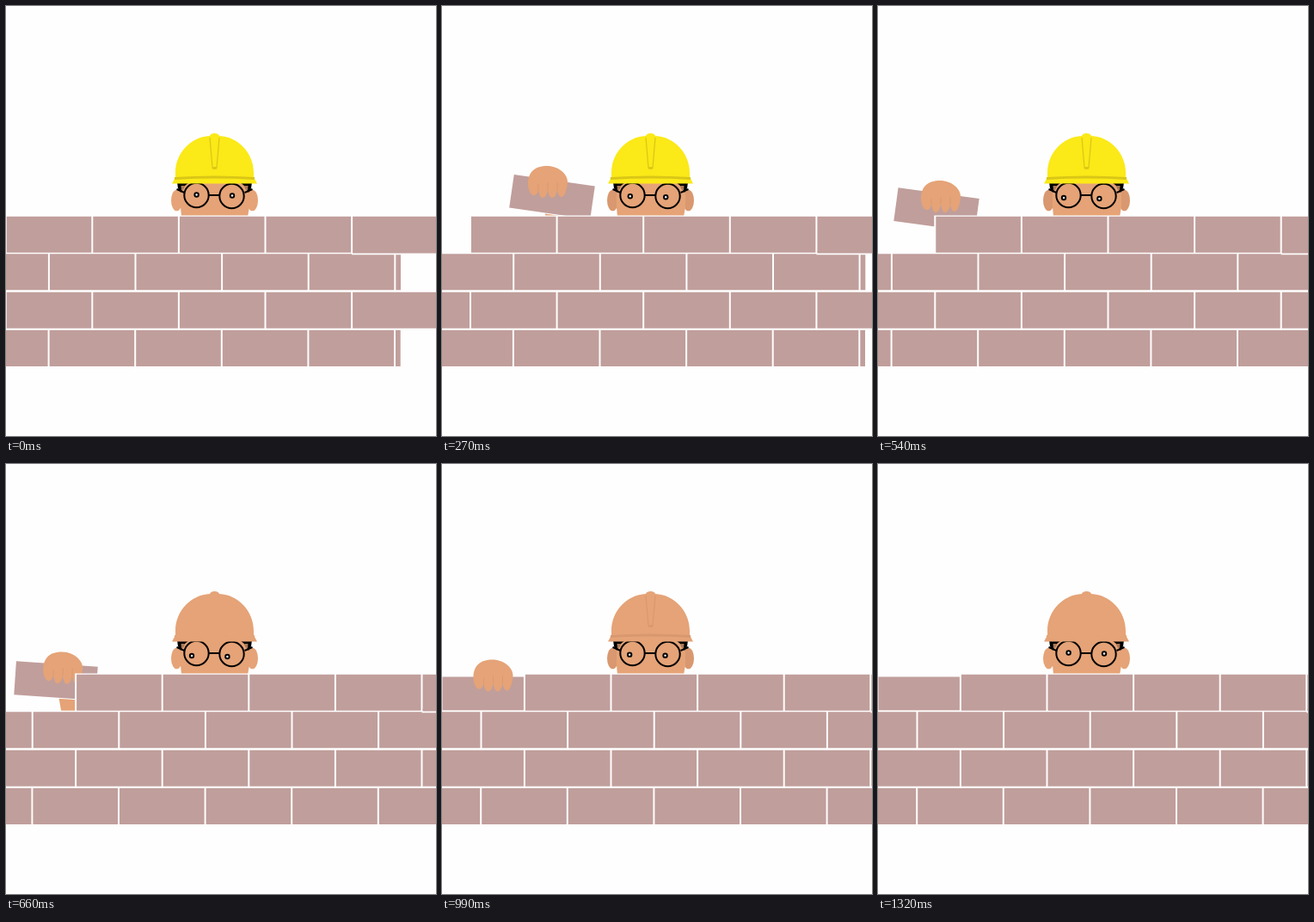
An HTML page without scripts that plays this animation: 500x500 px, repeating every 1.47 s.

```html
<!DOCTYPE html>
<html lang="en">
<head>
<meta charset="utf-8">
<title>Bricklayer</title>
<style>
  html, body { margin: 0; width: 100%; height: 100%; overflow: hidden; background: #fefefe; }
  svg { display: block; width: 100vw; height: 100vh; }

  :root { --skin: #e5a377; --shade: #d9986f; --brick: #c09e9b; --paper: #fefefe; --hat: #fbe918; --trim: #d9c616; }

  .skin { fill: var(--skin); }
  .paper { fill: var(--paper); }
  .row { fill: none; stroke: var(--brick); stroke-width: 42; stroke-dasharray: 98.6 2; }
  .block { fill: var(--brick); stroke: var(--paper); stroke-width: 2; paint-order: stroke; }
  .crease { fill: none; stroke: var(--shade); stroke-width: .8; }
  .glasses { fill: none; stroke: #000; stroke-width: 2; }

  .wall, .block, .arm, .pupils, .hat, .trim, .ears, .hair {
    animation: 1470ms infinite;
  }
  .wall { animation-name: wall; }
  .block { animation-name: block; }
  .arm { animation-name: arm; }
  .pupils { animation-name: look; }
  .hat, .trim, .ears, .hair { animation-timing-function: step-end; }
  .hat { animation-name: hat; }
  .trim { animation-name: trim; }
  .ears { animation-name: ears; }
  .hair { animation-name: hair; }

  /* Motion advances in 30 ms ticks. */
  @keyframes wall {
    0% { translate: 0; animation-timing-function: steps(26); }
    53.06%, 100% { translate: 96.2px; }
  }
  @keyframes block {
    0% { translate: 170px 290px; rotate: 8deg; animation-timing-function: steps(5); }
    10.2% { translate: 146px 246.5px; rotate: 8deg; animation-timing-function: steps(4); }
    18.36% { translate: 128px 222px; rotate: 8.2deg; animation-timing-function: steps(4); }
    26.53% { translate: 107.5px 213px; rotate: 8.3deg; animation-timing-function: steps(5); }
    36.73% { translate: 68px 237px; rotate: 7.7deg; animation-timing-function: steps(8); }
    53.06%, 100% { translate: 48px 267px; rotate: 0deg; }
  }
  @keyframes arm {
    0% { translate: 185px 268px; rotate: 0deg; animation-timing-function: steps(5); }
    10.2% { translate: 152px 221px; rotate: 0deg; animation-timing-function: steps(4); }
    18.36% { translate: 123px 205px; rotate: 0deg; animation-timing-function: steps(4); }
    26.53% { translate: 94.5px 202.5px; rotate: 0deg; animation-timing-function: steps(5); }
    36.73% { translate: 73px 222px; rotate: 0deg; animation-timing-function: steps(8); }
    53.06% { translate: 59.5px 253px; rotate: 4deg; animation-timing-function: steps(7); }
    67.34% { translate: 59.5px 246.5px; rotate: 0deg; animation-timing-function: steps(1); }
    69.38% { translate: 59.5px 246.5px; rotate: 0deg; animation-timing-function: steps(9); }
    87.75%, 100% { translate: 59.5px 308px; rotate: 0deg; }
  }
  @keyframes look {
    0% { translate: 0 0; animation-timing-function: steps(18); }
    36.73% { translate: -5.6px 3.5px; }
    57.14% { translate: -5.6px 3.5px; animation-timing-function: steps(13); }
    83.67%, 100% { translate: 0 0; }
  }
  @keyframes hat {
    0% { fill: var(--hat); }
    44.89%, 100% { fill: var(--skin); }
  }
  @keyframes trim {
    0% { stroke: var(--trim); }
    44.89% { stroke: var(--skin); }
    59.18% { stroke: var(--shade); }
    77.55%, 100% { stroke: var(--skin); }
  }
  @keyframes ears {
    0% { fill: var(--skin); }
    2.04% { fill: var(--shade); }
    44.89% { fill: var(--skin); }
    59.18% { fill: var(--shade); }
    77.55%, 100% { fill: var(--skin); }
  }
  @keyframes hair {
    0% { fill: #000; }
    59.18% { fill: #a97a58; }
    77.55%, 100% { fill: #000; }
  }
</style>
</head>
<body>
<svg viewBox="0 0 500 500">
  <defs>
    <g id="temple">
      <path class="hair" d="M199 205H213L208 209 205 214 203 217 200 212Z"/>
      <path fill="#a97a58" d="M203.500 209H208L206.500 213 204 215Z"/>
      <path class="glasses" d="M198.500 213L207.500 217"/>
    </g>
    <g id="pupil">
      <circle r="3.200"/>
      <circle class="paper" r="1.200"/>
    </g>
    <path id="course" class="row" d="M.7 0H610"/>
  </defs>

  <g id="head">
    <g class="ears">
      <ellipse cx="198.500" cy="226" rx="6.500" ry="12.300"/>
      <ellipse cx="286.500" cy="226" rx="6.500" ry="12.300"/>
    </g>
    <path class="skin" d="M203 204H283V234L281 245H204L203 234Z"/>
    <use href="#temple"/>
    <use href="#temple" transform="translate(485) scale(-1 1)"/>
    <g class="glasses">
      <circle cx="221.500" cy="220" r="14.200"/>
      <circle cx="262.500" cy="221" r="14.200"/>
      <path d="M236 220H248"/>
    </g>
    <g class="pupils">
      <use href="#pupil" x="221.600" y="219.500"/>
      <use href="#pupil" x="263" y="220.500"/>
    </g>
    <path class="hat" d="M193 206.500L197 199V194C197 171 215 152 237 151C238 147 247 147 248 151C270 152 288 171 288 194V199L292 206.500Z"/>
    <g class="trim" fill="none">
      <path stroke-width="3" d="M196 200.500Q242 197.500 289 200.500"/>
      <path stroke-width="1.200" d="M237 153L240 188H245L248 153"/>
      <path stroke-width="2.500" d="M240 188.500H245"/>
    </g>
  </g>

  <path class="arm skin" d="M-10 5H18L30 65H3Z"/>
  <rect class="block" x="-47.500" y="-19.500" width="95" height="39"/>
  <g class="arm">
    <path class="skin" d="M-23 2C-23 -13 -14 -19 -1 -19C13 -19 23 -9 23 -1C23 6 20 17 16 17C13 17 12 13 11 9C10 14 8 18 5 18C2 18 1 13 0 9C-1 14 -3 18 -6 18C-9 18 -10 13 -11 9C-12 13 -14 16 -17 15C-21 14 -23 7 -23 2Z"/>
    <path class="crease" d="M-11 9V2M0 9V0M11 9V0"/>
  </g>

  <g class="wall">
    <path class="paper" d="M-1.300 243.500H620V420H-220V286.700H-1.300Z"/>
    <use href="#course" y="265.700"/>
    <use href="#course" x="-151" y="309.300"/>
    <use href="#course" x="-100.600" y="353.700"/>
    <use href="#course" x="-151.300" y="398.100"/>
    <path class="paper" d="M402.100 286H560V289.200H402.100Z"/>
    <path fill="var(--brick)" d="M403.100 285H501.700V287.500H403.100Z"/>
  </g>
</svg>
</body>
</html>
```
